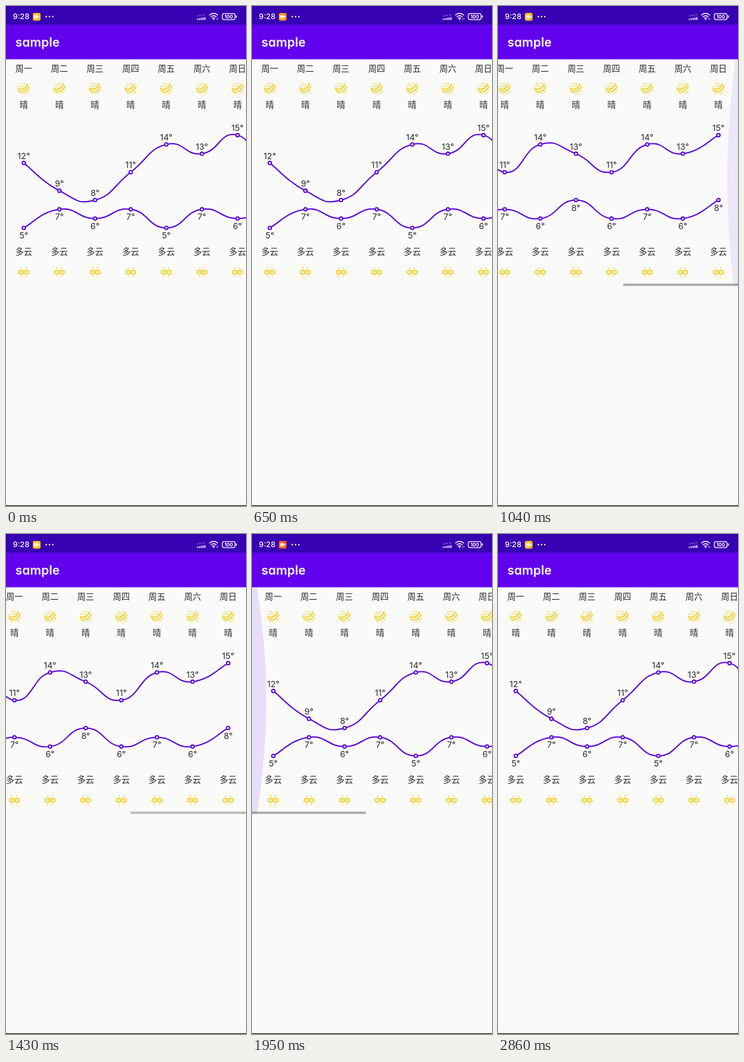
Animation, 385 px wide and 800 px high, one loop 2990 ms. Source, as an HTML page:

```html
<!DOCTYPE html>
<html lang="zh">
<head>
<meta charset="utf-8">
<title>sample</title>
<style>
  html, body { margin: 0; width: 100%; height: 100%; overflow: hidden; background: #fafafa; }
  svg { display: block; width: 385px; height: 800px; font-family: Inter, "Noto Sans CJK SC", "Noto Sans CJK", sans-serif; }
  .track text { font-size: 13.6px; fill: #2b2b2b; text-anchor: middle; }
  .line { fill: none; stroke: #5800d8; stroke-width: 2; }
  .dot { fill: #fff; stroke: #5800d8; stroke-width: 1.9; }
  .stroke { fill: none; stroke: #f8cf22; stroke-width: 2; stroke-linecap: round; }
  .dots { stroke-dasharray: 0 3.6; }
  .glow { fill: #6200ee; }
  .title { font-size: 20px; font-weight: 600; font-feature-settings: "cv11"; }
</style>
</head>
<body>
<svg viewBox="0 0 385 800">
  <defs>
    <clipPath id="view"><rect y="85" width="385" height="363"/></clipPath>
    <clipPath id="disc"><circle r="10"/></clipPath>
    <path id="wave" class="stroke" d="M-11-1C-5 4 2 3 7-8"/>
    <g id="sun" clip-path="url(#disc)">
      <use href="#wave"/>
      <use href="#wave" x="2" y="4.4"/>
      <use href="#wave" x="4" y="8.8"/>
      <path class="stroke dots" d="M-8-3L2-3M-6-7L3-7"/>
    </g>
    <g id="cloud">
      <ellipse class="stroke" cx="-4.3" rx="3.6" ry="3"/>
      <ellipse class="stroke" cx="4.3" rx="3.6" ry="3"/>
      <path class="stroke" stroke-width="1.6" d="M-3.7-6.6h0M3.7-6.6h0M-3.7 6.4h0M3.7 6.4h0"/>
    </g>
  </defs>
  <rect width="385" height="800" fill="#fafafa"/>

  <g clip-path="url(#view)">
    <g class="track" id="track"></g>
    <path class="glow" id="glowL" d="M0 85H8Q38 266 8 448H0Z"/>
    <path class="glow" id="glowR" d="M385 85H381Q356.5 266 378 448H385Z"/>
    <rect id="bar" y="444" width="185.3" height="4"/>
  </g>

  <rect y="30" width="385" height="55.3" fill="#6200ee"/>
  <rect width="385" height="30" fill="#3700b3"/>
  <g fill="#fff">
    <text class="title" x="15" y="65">sample</text>
    <text x="11" y="21.3" font-size="12.2" font-weight="500">9:28</text>
    <rect id="rec" x="43" y="11" width="12.5" height="12.5" rx="3.2"/>
    <rect x="45.5" y="14.6" width="5.4" height="5.4" rx="1"/>
    <path d="M51.3 17.3l2.2-2v4z"/>
    <circle cx="64.6" cy="17" r="1.2"/><circle cx="69.8" cy="17" r="1.2"/><circle cx="75" cy="17" r="1.2"/>
    <g id="signal"></g>
    <path d="M316 12.5l3.5 3.5m0-3.5l-3.5 3.5" stroke="#fff" opacity=".35"/>
    <g fill="none" stroke="#fff" stroke-width="1.5">
      <path d="M326 14.7Q333 8.8 340 14.7M328.4 17.5Q333 13.6 337.6 17.5M330.6 20Q333 18 335.4 20"/>
      <rect x="347" y="12.2" width="20.5" height="9.6" rx="3" stroke-width="1.3"/>
    </g>
    <circle cx="333" cy="21.6" r="1.1"/>
    <path d="M338 19v3.5M340 19v3.5" stroke="#fff" stroke-width=".8" opacity=".7"/>
    <rect x="368.8" y="15" width="1.5" height="4" rx=".7"/>
    <text x="357.3" y="19.8" font-size="7.6" font-weight="700" text-anchor="middle">100</text>
  </g>
  <rect y="799" width="385" height="1"/>
</svg>
<script>
const LOOP = 2990, STEP = 130, VIEW = 385, CONTENT = 800, COL = CONTENT / 14;
const highs = [12, 9, 8, 11, 14, 13, 15, 11, 14, 13, 11, 14, 13, 15];
const lows = [5, 7, 6, 7, 5, 7, 6, 7, 6, 8, 6, 7, 6, 8];
const $ = id => document.getElementById(id);

const colX = i => COL * (i + 0.5);
const tempY = t => 429.1 - 14.83 * t;
const text = (x, y, s) => `<text x="${x}" y="${y}">${s}</text>`;
const icon = (id, x, y) => `<use href="#${id}" transform="translate(${x} ${y})"/>`;

// Smooth cubic through all points, tangents taken from the neighbours.
function curve(temps) {
  const at = i => {
    const n = Math.max(0, Math.min(temps.length - 1, i));
    return [colX(n), tempY(temps[n])];
  };
  const handle = (i, k) => at(i).map((v, a) => v + k * (at(i + 1)[a] - at(i - 1)[a]));
  const d = temps.map((_, i) => i ? `C${handle(i - 1, 0.25)} ${handle(i, -0.25)} ${at(i)}` : 'M' + at(0));
  return `<path class="line" d="${d.join('')}"/>`;
}

function series(temps, labelDy) {
  return curve(temps) + temps.map((t, i) =>
    `<circle class="dot" cx="${colX(i)}" cy="${tempY(t)}" r="2.6"/>` +
    text(colX(i), tempY(t) + labelDy, t + '°')).join('');
}

function day(i) {
  const x = colX(i);
  return text(x, 105, '周' + '一二三四五六日'[i % 7]) + icon('sun', x, 131.5) + text(x, 163.2, '晴') +
    text(x, 398.3, '多云') + icon('cloud', x, 426);
}

$('track').innerHTML = highs.map((_, i) => day(i)).join('') + series(highs, -6.6) + series(lows, 17.2);

for (let i = 0; i < 5; i++) {
  const h = 2 + i * 0.6, x = 306 + i * 3;
  $('signal').innerHTML += `<rect x="${x}" y="${22.3 - h}" width="2" height="${h}" opacity=".85"/>`;
  if (i < 3) $('signal').innerHTML += `<rect x="${x}" y="${17 - h}" width="2" height="${h - 0.5}" opacity=".3"/>`;
}

const clamp = v => Math.max(0, Math.min(1, v));
const ease = (t, from, to) => {
  const p = clamp((t - from) / (to - from));
  return p * p * (3 - 2 * p);
};
// Jumps to 1 at the hit, then dies away.
const decay = (t, hit, length) => t < hit ? 0 : clamp(1 - (t - hit) / length);
// Fully shown from one time to another, then fades out.
const shown = (t, from, to) => t > from ? clamp(1 - (t - to) / 350) : 0;

const RIGHT_HIT = 910, LEFT_HIT = 1950;

function draw() {
  const t = Math.floor(performance.now() % LOOP / STEP) * STEP;
  const fling = ease(t, 650, RIGHT_HIT) - ease(t, 1620, LEFT_HIT);
  const bounce = decay(t, RIGHT_HIT, 260) - decay(t, LEFT_HIT, 260);
  const x = (CONTENT - VIEW) * fling + 5.6 * bounce;
  const pulse = Math.cos(2 * Math.PI * (t - 1430) / 347);

  $('track').setAttribute('transform', `translate(${-x} 0)`);
  $('bar').setAttribute('x', x * VIEW / CONTENT);
  $('bar').setAttribute('opacity', 0.3 * Math.max(shown(t, 650, 1360), shown(t, 1560, 2480)));
  $('glowR').setAttribute('opacity', 0.11 * decay(t, RIGHT_HIT, 500));
  $('glowL').setAttribute('opacity', 0.115 * decay(t, LEFT_HIT, 500));
  $('rec').setAttribute('fill', `hsl(${32 + 14 * pulse} 98% 55%)`);
  requestAnimationFrame(draw);
}
draw();
</script>
</body>
</html>
```
